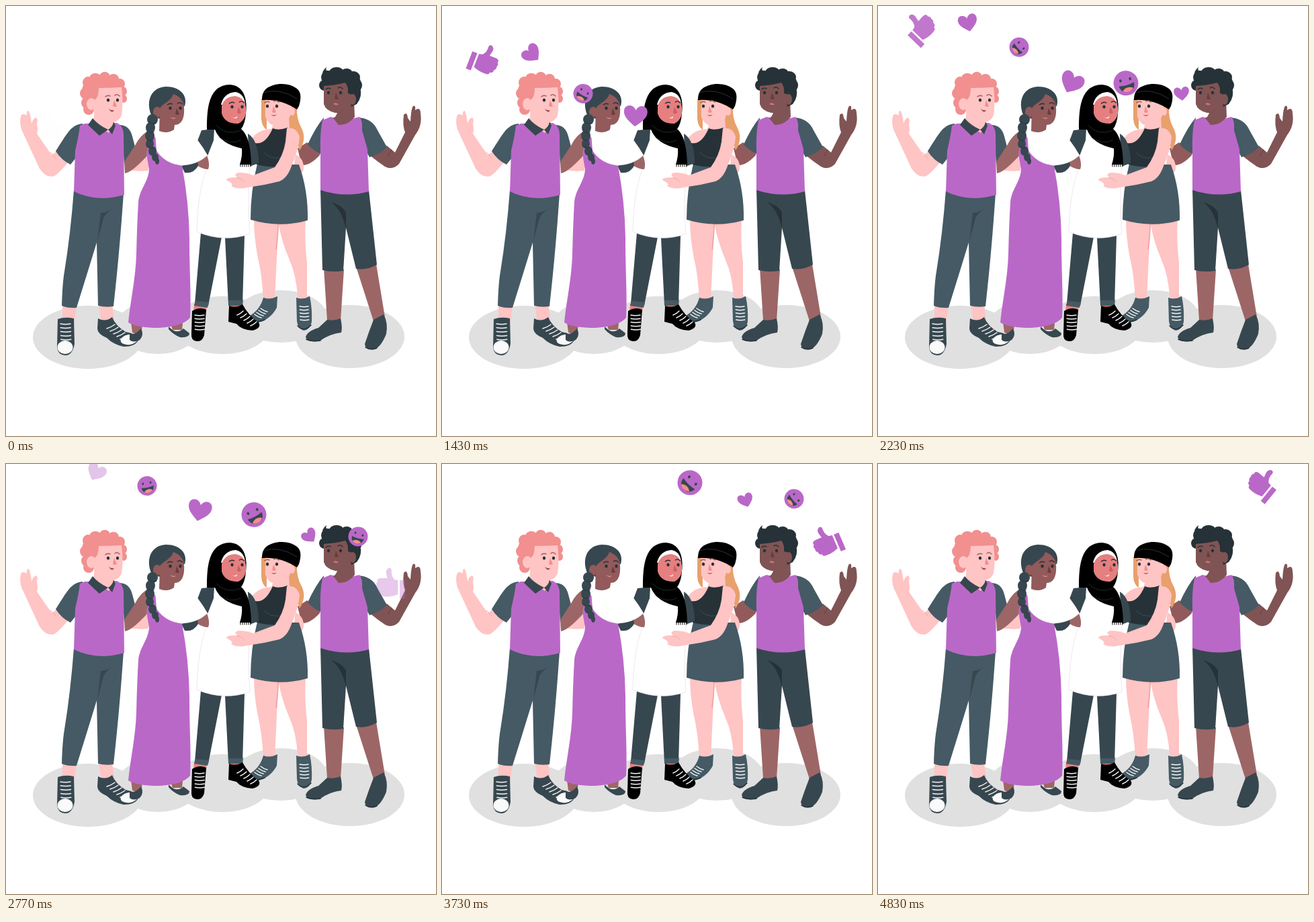
Write an HTML page with a canvas that moves like this. It is 640 by 640 pixels and loops after 4.86 s.

```html
<!DOCTYPE html>
<html lang="en">
<head>
<meta charset="utf-8">
<title>Friends</title>
<style>
html, body { margin: 0; width: 100%; height: 100%; overflow: hidden; background: #fff; }
canvas { display: block; }
</style>
</head>
<body>
<canvas id="stage" width="640" height="640"></canvas>
<script>
const LOOP = 4860, LIFE = 2500, STAGGER = 2700 / 7;
const PURPLE = '#ba68c8', SLATE = '#455a64', DARK = '#37474f', INK = '#263238';
const PINK = '#ffc4c4', CORAL = '#f28f8f', BROWN = '#805454', UMBER = '#925a5b', TAN = '#9d6666', ROSE = '#e57f80';
const BLUSH = '#f0a0a0', BLONDE = '#e8a06c', WHITE = '#fff', BLACK = '#000';

const stage = document.getElementById('stage').getContext('2d');
const scene = document.createElement('canvas');
scene.width = scene.height = 640;
let ctx = scene.getContext('2d');

const fill = (color, d) => { ctx.fillStyle = color; ctx.fill(new Path2D(d)); };
const line = (color, width, d) => {
  ctx.strokeStyle = color;
  ctx.lineWidth = width;
  ctx.lineCap = ctx.lineJoin = 'round';
  ctx.stroke(new Path2D(d));
};
const oval = (color, x, y, rx, ry = rx, tilt = 0) => {
  ctx.fillStyle = color;
  ctx.beginPath();
  ctx.ellipse(x, y, rx, ry, tilt, 0, 2 * Math.PI);
  ctx.fill();
};
const blobs = (color, list) => list.forEach(([x, y, rx, ry]) => oval(color, x, y, rx, ry));

// Evenly spaced laces stepping by (dx, dy), each one (w, h) long.
function laces(x, y, dx, dy, w, h, count) {
  for (let i = 0; i < count; i++) {
    line('#f5f5f5', 1.5, `M${x + dx * i},${y + dy * i} q${w / 2},${h / 2 + 1.5} ${w},${h}`);
  }
}

// Eyes, brows and nose placed around the point between the eyes.
function face(x, y, gap, shade, brow) {
  for (const side of [-1, 1]) {
    const ex = x + side * gap / 2;
    oval(INK, ex, y, 2.2, 2.6);
    line(brow, 1.5, `M${ex - 4},${y - 6 - side} q3,-3 7,${side}`);
  }
  fill(shade, `M${x + 2},${y} l4,9 q-3,2 -6,0 Z`);
}

function ground() {
  blobs('#e0e0e0', [[122, 493, 82, 47], [226, 478, 62, 40], [322, 475, 72, 43], [409, 462, 68, 39], [512, 492, 81, 47]]);
}

function curlyMan() {
  fill(PINK, 'M178,222 L196,212 L214,230 L212,245 Q195,247 178,243 Z');
  fill(PINK, 'M25,188 C20,178 20,165 24,161 Q29,161 31,163 Q30,156 34,156 Q37,164 38,175 Q40,167 45,166 Q48,168 46,176 Q48,184 46,190 L68,222 L77,215 L92,233 Q80,248 72,253 Q60,257 50,242 Z');
  line(BLUSH, 1, 'M66,218 L74,226');
  fill(PINK, 'M84,445 L105,445 L102,470 L84,468 Z M138,444 L158,444 L161,467 L142,470 Z');
  fill(SLATE, 'M101,274 Q138,287 175,279 C171,335 167,385 160,447 Q148,449 137,446 L135,352 Q124,388 105,449 Q92,450 83,446 Q84,412 87,395 Q96,340 101,274 Z');
  fill(DARK, 'M141,308 Q151,307 160,301 Q148,308 145,316 L136,350 Z');
  fill(SLATE, 'M114,175 C96,177 91,190 74,216 Q82,229 96,236 L104,226 L116,200 Z');
  fill(SLATE, 'M170,177 Q184,178 188,194 L193,213 Q187,227 176,235 L173,195 Z');
  fill(PURPLE, 'M117,175 L165,174 Q174,178 175,190 L176,281 Q135,293 101,276 L103,215 Q108,195 110,178 Z');
  fill(PINK, 'M132,155 L160,165 L161,178 L153,189 L130,172 Z');
  fill(DARK, 'M129,167 L122,177 L139,193 L152,184 Q137,177 129,167 Z M160,172 L163,178 L158,191 L152,184 Q159,180 160,172 Z');
  oval(CORAL, 142, 126, 29, 21);
  blobs(CORAL, [[119, 130, 9, 9], [122, 114, 8, 9], [133, 108, 9, 8], [147, 106, 8, 8], [160, 109, 8, 8],
    [169, 116, 8, 8], [174, 127, 6, 7], [119, 144, 7, 8], [123, 154, 8, 8], [175, 138, 5, 6]]);
  fill(PINK, 'M132,140 Q138,136 138,122 Q156,122 172,121 Q175,145 172,163 Q166,176 150,173 Q136,172 131,158 Z');
  oval(PINK, 127, 146, 7, 9);
  face(159, 140, 14, CORAL, '#a85c5c');
  fill('#9c4848', 'M153,153 q4,3 8,2 q-3,6 -8,-2 Z');
  fill(DARK, 'M77,466 Q88,462 101,465 L102,503 Q99,520 88,520 Q77,519 76,508 Z');
  oval('#fafafa', 88, 508, 11.5, 10);
  laces(81, 473, .2, 5.8, 15, 0, 5);
  fill(DARK, 'M137,465 Q148,471 158,463 Q163,476 178,485 Q197,489 197,497 Q193,507 175,507 Q160,504 150,494 Q136,488 136,480 Z');
  oval('#fafafa', 183.5, 496.5, 13, 7.5, -.15);
  laces(150, 480, 5, 4, 12, -6, 5);
}

function tallMan() {
  fill(UMBER, 'M448,203 L468,217 L467,222 Q452,238 440,237 L434,212 Z');
  fill(SLATE, 'M473,166 Q461,180 449,206 Q458,216 469,220 Z');
  fill(BROWN, 'M540,221 L567,208 L579,218 L594,188 Q590,178 592,162 Q597,156 598,167 L602,172 Q603,152 606,149 Q610,147 609,155 Q617,149 617,160 Q620,178 609,192 L585,235 Q575,245 564,239 Q552,231 540,221 Z');
  line('#6d3c3e', 1, 'M569,223 Q572,217 574,214');
  fill(TAN, 'M473,390 L503,392 L498,468 L478,468 Z M521,388 L551,384 L564,463 L547,469 Z');
  fill(DARK, 'M468,272 Q505,284 540,274 L552,385 Q536,394 521,391 L506,330 L502,394 Q486,397 471,393 Z');
  fill(INK, 'M484,292 Q499,296 506,307 L506,332 Q500,303 484,292 Z');
  fill(SLATE, 'M524,166 Q545,167 553,185 L567,210 Q556,221 541,225 L530,205 Z');
  fill(PURPLE, 'M483,165 Q505,172 526,165 Q531,170 530,185 L538,213 L540,276 Q505,286 468,274 L468,215 Q467,190 471,170 Z');
  fill(BROWN, 'M494,150 L518,140 L519,165 Q509,178 495,177 L487,167 Q494,164 494,150 Z');
  oval(INK, 499, 114, 29, 19);
  blobs(INK, [[479, 106, 10, 10], [492, 99, 11, 8], [507, 101, 9, 8], [517, 106, 10, 9], [523, 118, 7, 9], [474, 118, 8, 8]]);
  fill(INK, 'M473,104 Q468,98 477,91 Q474,98 483,98 Z');
  fill(INK, 'M508,122 L527,121 Q531,135 522,146 L514,150 Z');
  fill(BROWN, 'M473,119 Q491,118 505,114 Q510,120 509,130 L515,132 L511,149 Q505,160 490,159 Q476,156 473,146 Z');
  oval(BROWN, 516, 139, 5, 8);
  face(489, 129, 18, '#6d3c3e', INK);
  fill('#d87575', 'M487,146 q4,-4 8,1 q-4,1 -8,-1 Z');
  fill(DARK, 'M478,467 Q488,469 498,465 Q501,478 499,486 Q482,488 468,498 Q450,502 446,493 Q448,484 465,479 Z M547,467 L562,459 Q569,472 566,488 Q558,508 548,511 Q535,513 534,503 Q540,485 547,467 Z');
  line(INK, 1.5, 'M447,496 Q455,500 468,498 M535,508 Q542,513 552,509');
}

function beanieWoman() {
  fill(BLONDE, 'M380,138 L388,140 L388,184 Q381,180 380,168 Z M422,145 L433,150 Q432,168 440,182 Q448,198 437,215 Q432,195 420,182 Z');
  fill(PINK, 'M367,196 Q376,184 395,183 L404,160 L421,162 L422,183 Q410,205 372,207 Z');
  fill(PINK, 'M431,221 Q444,227 443,243 Q440,253 432,250 Q427,238 431,221 Z');
  fill(PINK, 'M369,317 L406,322 L403,375 L400,436 Q391,441 383,437 Q381,400 375,375 Q369,345 369,317 Z M405,322 L446,317 Q444,350 448,382 L448,434 Q440,438 434,433 Q432,400 422,378 Q410,350 405,322 Z');
  line(BLUSH, 1.5, 'M405,324 Q405,340 402,362');
  fill(SLATE, 'M374,235 L436,236 Q450,275 449,319 Q407,331 364,318 Q364,275 374,235 Z');
  fill(INK, 'M397,182 Q405,186 419,181 Q417,205 424,215 L422,238 Q397,242 373,236 Q366,220 371,204 Q386,207 397,182 Z');
  line('#455a64', .7, 'M384,218 Q393,228 407,226');
  fill(PINK, 'M385,136 L426,143 L424,160 Q419,178 404,179 Q391,178 386,165 Z');
  oval(PINK, 426, 157, 4, 6);
  fill(BLONDE, 'M380,138 L386,138 Q387,150 384,166 L380,168 Z');
  fill(BLACK, 'M381,140 Q380,119 407,116 Q423,115 433,123 Q442,130 436,149 L433,154 Q409,138 381,140 Z');
  line('#37474f', .7, 'M383,129 Q406,121 433,138');
  face(396, 149, 14, CORAL, '#9b6046');
  fill('#a94b4b', 'M394,161 q4,3 9,0 q-4,6 -9,0 Z');
  fill(SLATE, 'M383,434 Q393,438 404,432 L403,449 Q394,466 376,471 Q361,469 361,462 Q378,453 383,434 Z M432,434 Q442,438 452,432 Q456,450 455,470 Q453,482 443,483 Q434,480 433,469 Z');
  line(INK, 1.5, 'M361,465 Q372,473 385,467 M434,476 Q443,486 454,475');
  laces(379, 450, -3, 3, 10, 5, 4);
  laces(437, 447, .2, 5, 13, 0, 5);
}

function hijabWoman() {
  fill(DARK, 'M360,190 Q376,200 376,234 L362,239 Z');
  fill(ROSE, 'M280,443 L299,443 L298,456 L279,456 Z M333,443 L351,443 L352,450 L332,450 Z');
  fill(DARK, 'M290,338 L321,344 L301,446 L281,443 Z M326,345 L355,342 L352,445 L331,445 Z');
  fill(SLATE, 'M282,439 L302,441 L300,449 L280,446 Z M331,438 L353,438 L352,446 L331,446 Z');
  fill(WHITE, 'M308,186 L352,202 L364,225 Q360,280 363,339 Q325,353 284,336 Q285,275 297,246 Q305,228 306,210 Z');
  line('#eadcec', .7, 'M297,246 Q285,280 284,336 Q325,353 363,339 Q359,290 363,240');
  fill(DARK, 'M291,185 L310,183 L309,200 L300,223 Q291,211 283,206 Z');
  fill(BLACK, 'M299,184 C299,150 302,118 333,117 C353,118 360,137 357,160 Q356,175 350,183 Q364,194 365,236 L348,236 Q352,223 351,212 Q319,205 311,184 Z');
  for (let x = 349; x < 366; x += 3) line(BLACK, 1, `M${x},235 l0,4`);
  line('#37474f', .6, 'M313,178 Q328,194 350,185 M318,196 Q334,207 349,200');
  fill(WHITE, 'M320,147 Q324,129 342,128 Q355,131 356,147 Z');
  fill(ROSE, 'M321,149 Q325,135 341,134 Q355,136 357,151 Q359,168 346,175 Q326,176 321,160 Z');
  face(344, 150, 15, '#c95f64', INK);
  fill('#fff', 'M336,165 q5,3 8,-1 q0,6 -8,1 Z');
  fill(BLACK, 'M277,454 Q288,447 298,452 L295,490 Q292,500 284,499 Q275,498 276,488 Z M332,446 Q343,450 352,444 Q361,461 376,471 Q381,479 367,483 Q350,482 343,473 L331,470 Z');
  laces(281, 460, .1, 5.3, 14, 0, 5);
  laces(344, 460, 5, 4, 9, -6, 5);
}

function braidWoman() {
  fill(TAN, 'M285,228 L299,222 Q304,235 301,243 Q293,243 284,237 Z');
  fill(DARK, 'M261,238 L285,231 L286,238 Q279,250 266,248 Z');
  fill(TAN, 'M186,470 L203,474 L201,490 L188,486 Z M244,470 L263,472 L262,482 L248,482 Z');
  fill(DARK, 'M184,486 Q190,492 201,480 Q206,490 199,497 Q190,502 184,497 Z M242,477 Q254,490 264,480 L273,487 Q273,494 259,493 Q249,489 242,481 Z');
  fill(TAN, 'M212,186 Q200,192 193,206 L176,232 L177,249 Q187,248 212,221 Z');
  fill(PURPLE, 'M215,188 L262,238 Q272,290 273,345 C273,400 276,430 274,464 Q263,477 228,479 Q195,479 182,471 C185,440 193,405 194,370 Q195,325 197,292 C199,272 212,262 213,243 L209,220 Z');
  fill(WHITE, 'M222,190 Q238,180 270,183 Q287,199 300,222 Q284,237 260,237 Q236,234 224,215 Z');
  line('#eeeeee', .6, 'M224,215 Q236,234 260,237 Q284,237 300,222');
  fill(DARK, 'M218,166 C207,145 214,121 238,120 C259,120 271,133 266,149 L246,150 L231,168 Z');
  fill(UMBER, 'M229,152 C234,144 246,142 249,131 C257,134 265,140 265,151 C266,166 262,177 251,177 L250,184 Q240,191 228,186 Z');
  oval(UMBER, 225, 158, 6, 8);
  face(252, 152, 15, '#6d3c3e', INK);
  fill('#e58a8a', 'M244,165 q5,3 9,1 q-4,5 -9,-1 Z');
  blobs(DARK, [[218, 169, 8, 8], [215, 181, 7, 8], [214, 193, 7, 8], [214, 205, 6, 7], [218, 216, 6, 7], [222, 225, 5, 6], [225, 231, 3, 5]]);
  line('#263238', .7, 'M212,172 q6,6 12,2 M209,185 q6,6 12,2 M209,197 q6,6 11,2 M210,208 q6,6 11,2');
}

function reachingArm() {
  fill(PINK, 'M418,182 Q433,180 437,195 Q436,212 425,238 Q419,256 407,261 Q384,267 360,270 Q345,274 335,268 Q340,265 328,259 Q328,255 344,255 Q338,250 346,248 Q359,248 368,252 L400,240 Q413,222 416,202 Z');
  line(BLUSH, .8, 'M344,256 Q351,257 354,261');
}

function thumb(flip) {
  ctx.scale(1.05 * flip, 1.05);
  fill(PURPLE, 'M-18,-5 H-10.5 V21 H-18 Z');
  fill(PURPLE, 'M-8,-5 L-3,-6 Q2,-11 1,-20 Q2,-23 5,-22.5 Q10,-20 8.5,-14 L7,-8 L17,-8 Q23,-7 21,-3 Q24,0 22,3 Q23,7 20,9 Q20,14 16,14 Q16,18 11,18 Q2,19 -8,15 Z');
}

function heart(size) {
  ctx.scale(size, size);
  fill(PURPLE, 'M0,.9 C-.35,.6 -1,.2 -1,-.35 C-1,-.98 -.25,-1.05 0,-.48 C.25,-1.05 1,-.98 1,-.35 C1,.2 .35,.6 0,.9 Z');
}

function smiley(size) {
  ctx.scale(size, size);
  oval(PURPLE, 0, 0, 1);
  oval(DARK, -.37, -.3, .1, .12);
  oval(DARK, .42, -.25, .1, .12);
  fill(DARK, 'M-.62,.1 Q0,.25 .65,.1 Q.6,.72 0,.73 Q-.58,.7 -.62,.1 Z');
  fill(CORAL, 'M-.42,.55 Q0,.2 .46,.52 Q.3,.73 0,.73 Q-.3,.72 -.42,.55 Z');
}

// ys: heights at equal steps of the rise; turn: degrees halfway and at the end.
const icons = [
  { x: 61, ys: [182, 152, 93, 51, 25], turn: [25, -55], draw: () => thumb(1) },
  { x: 134, ys: [115, 95, 59, 24, 11], turn: [-50, 30], draw: () => heart(14.2) },
  { x: 210, ys: [165, 133, 76, 38, 18], turn: [55, -50], draw: () => smiley(14.5) },
  { x: 288, ys: [168, 151, 99, 51, 24], turn: [28, -52], draw: () => heart(17.5) },
  { x: 369, ys: [153, 119, 74, 40, 20], turn: [-28, 57], draw: () => smiley(18.5) },
  { x: 452, ys: [137, 119, 82, 51, 29], turn: [-50, 26], draw: () => heart(11.4) },
  { x: 524, ys: [131, 98, 61, 30, 15], turn: [55, -50], draw: () => smiley(14.5) },
  { x: 575, ys: [180, 152, 93, 44, 19], turn: [-25, 55], draw: () => thumb(-1) }
];

const ease = p => (1 - Math.cos(Math.PI * p)) / 2;

function spline(keys, p) {
  const at = i => keys[Math.max(0, Math.min(keys.length - 1, i))];
  const pos = p * (keys.length - 1), i = Math.floor(pos), u = pos - i;
  const a = at(i - 1), b = at(i), c = at(i + 1), d = at(i + 2);
  return b + u / 2 * (c - a + u * (2 * a - 5 * b + 4 * c - d + u * (3 * (b - c) + d - a)));
}

function drawIcon({ x, ys, turn: [mid, end], draw }, p) {
  const angle = p < .5 ? mid * ease(2 * p) : mid + (end - mid) * ease(2 * p - 1);
  ctx.save();
  ctx.globalAlpha = Math.min(1, p / .08, (1 - p) / .12);
  ctx.translate(x, spline(ys, p));
  ctx.rotate(angle * Math.PI / 180);
  draw();
  ctx.restore();
}

function frame() {
  const t = performance.now() % LOOP;
  ctx.drawImage(scene, 0, 0);
  icons.forEach((icon, i) => {
    const p = (t - i * STAGGER) / LIFE;
    if (p > 0 && p < 1) drawIcon(icon, p);
  });
  requestAnimationFrame(frame);
}

fill(WHITE, 'M0,0 H640 V640 H0 Z');
[ground, curlyMan, tallMan, beanieWoman, hijabWoman, braidWoman, reachingArm].forEach(part => part());
ctx = stage;
frame();
</script>
</body>
</html>
```
